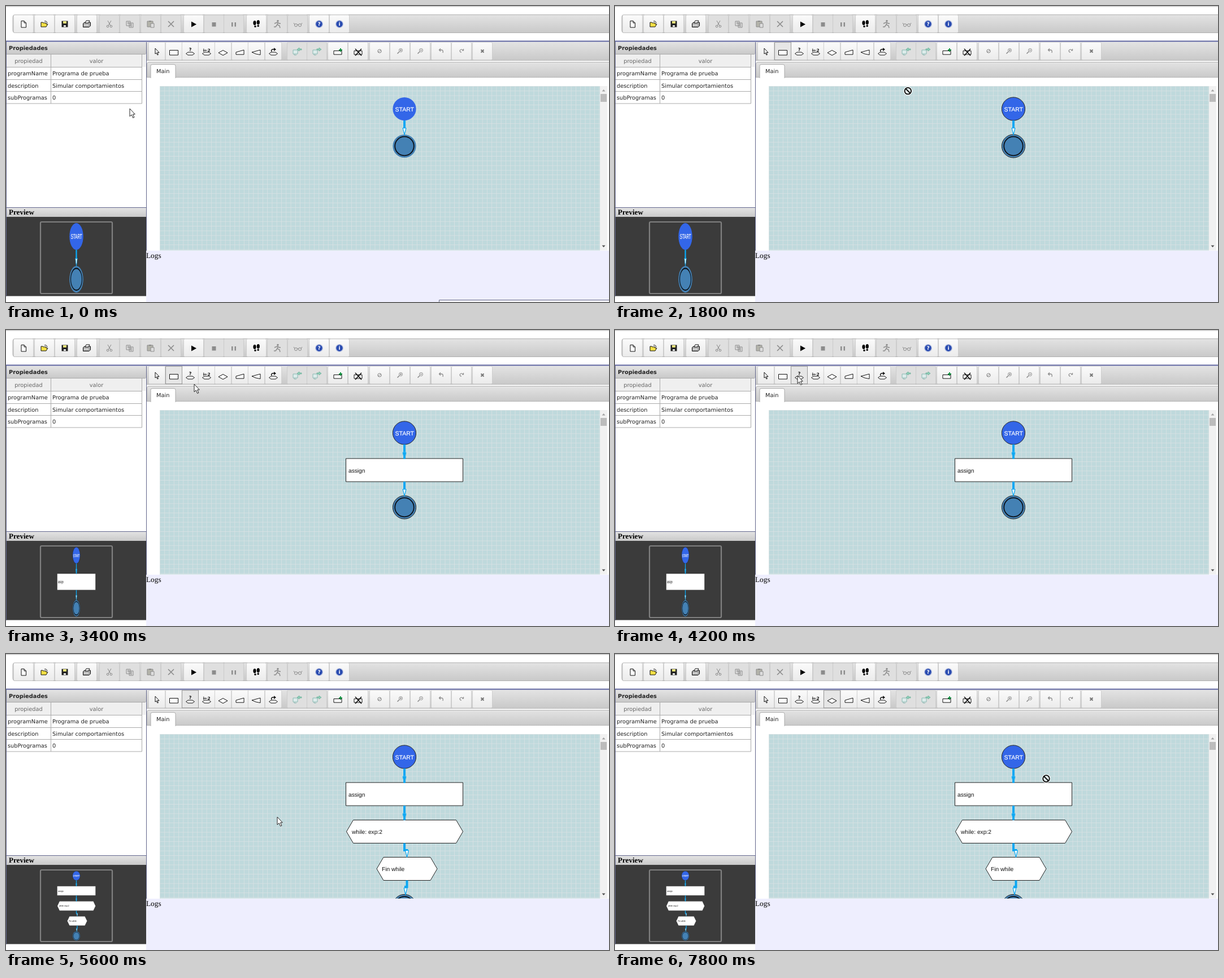
Recreate the animation shown at these times as an HTML page. Size 1067 by 525 pixels, loop 8 s.

```html
<!DOCTYPE html>
<html lang="es">
<head>
<meta charset="utf-8">
<style>
html, body { margin: 0; width: 100%; height: 100%; overflow: hidden; background: #fff; }
svg { display: block; text-rendering: geometricPrecision; }
.ui { font: 9.8px "DejaVu Sans", sans-serif; fill: #222; }
.serif { font: 13.3px "Liberation Serif", serif; fill: #000; }
.bold { font-weight: bold; }
.head { fill: #666; text-anchor: middle; }
.flow text { font: 10.2px "Liberation Sans", sans-serif; fill: #111; }
.flow .start { font-size: 10.5px; fill: #fff; stroke: #fff; stroke-width: .2; text-anchor: middle; }
</style>
</head>
<body>
<svg width="1067" height="525" viewBox="0 0 1067 525">
  <defs>
    <linearGradient id="bar" x2="0" y2="1"><stop stop-color="#e3e3e3"/><stop offset="1" stop-color="#c9c9c9"/></linearGradient>
    <linearGradient id="btn" x2="0" y2="1"><stop stop-color="#fbfbfb"/><stop offset="1" stop-color="#ebebeb"/></linearGradient>
    <pattern id="grid" x="272" y="142" width="8.27" height="8.27" patternUnits="userSpaceOnUse">
      <path d="M0 .4H8.27M.4 0V8.27" stroke="#d9e2e4" stroke-width=".85"/>
    </pattern>
    <clipPath id="view"><path d="M272 142H1051V433.5H272Z"/></clipPath>
  </defs>

  <path d="M0 0H1067V1.5H0Z" fill="#c9c9c9"/>
  <rect x="12" y="15.5" width="1070" height="32" rx="4" fill="url(#bar)" stroke="#b0b0b0"/>
  <path d="M249 64H1067V96H249Z" fill="url(#bar)"/>
  <path d="M249 96.5H1067" stroke="#b5b5b5"/>

  <!-- properties panel -->
  <path d="M1 64H248V85H1Z" fill="url(#bar)"/>
  <path d="M1 86H247V108H1Z" fill="#efefef"/>
  <path d="M1 85.5H247M1 108.5H240M1 130.5H240M1 151.5H240M1 173H240.5V86M79.5 86V173" fill="none" stroke="#aaa"/>
  <g class="ui">
    <text class="bold" x="5" y="77.5">Propiedades</text>
    <text class="head" x="40" y="101">propiedad</text><text class="head" x="160" y="101">valor</text>
    <text x="3" y="123">programName</text><text x="82" y="123">Programa de prueba</text>
    <text x="3" y="144.5">description</text><text x="82" y="144.5">Simular comportamientos</text>
    <text x="3" y="166">subProgramas</text><text x="82" y="166">0</text>
  </g>

  <!-- preview panel -->
  <path d="M1 358H248V374H1Z" fill="url(#bar)"/>
  <path d="M1 374H248V514.5H1Z" fill="#3b3b3b"/>
  <rect x="61" y="383" width="127" height="127" rx="2" fill="none" stroke="#808080" stroke-width="2.2"/>
  <g id="preview" class="flow"></g>
  <text class="serif bold" x="5" y="370" style="font-size:13.1px">Preview</text>

  <!-- editor -->
  <path d="M249 127V103Q249 99.5 253 99.5H1067V127Z" fill="url(#bar)"/>
  <path d="M249.5 127V103Q249.5 99.5 253 99.5H1067M249 126.5H1067" fill="none" stroke="#b5b5b5"/>
  <path d="M256 128V106.5Q256 103.5 259 103.5H297Q300 103.5 300 106.5V128" fill="#fff" stroke="#aaa"/>
  <text class="ui" x="266" y="119">Main</text>
  <path d="M272 142H1051V433.5H272Z" fill="#bfd9dc"/>
  <path d="M272 142H1051V433.5H272Z" fill="url(#grid)"/>
  <path d="M1051 142H1064V433.5H1051Z" fill="#f1f1f1"/>
  <path d="M1052 156H1063V170H1052Z" fill="#bcbcbc"/>
  <path d="M1054.5 151.5L1057.5 148L1060.5 151.5Z" fill="#a3a3a3"/>
  <path d="M1054.5 424.5L1057.5 428L1060.5 424.5Z" fill="#505050"/>
  <g clip-path="url(#view)"><g id="main" class="flow"></g></g>
  <path d="M248 434H1067V525H248Z" fill="#eeeefe"/>
  <text class="serif" x="248" y="447">Logs</text>
  <path id="status" d="M766.5 526V521.5H1068V526Z" fill="#f2f2fa" stroke="#676a86"/>
  <path d="M0 62.5H1067" stroke="#5a609c" stroke-width="2.2"/>
  <path d="M.5 63V515M248.5 64V434M0 357.5H248" stroke="#62668c"/>

  <g id="buttons"></g>
  <rect id="press" y="64.5" width="29" height="31" fill="#e6e6e6" stroke="#999"/>
  <g id="icons"></g>
  <g id="cursor"></g>
</svg>
<script>
const $ = id => document.getElementById(id);
const shape = (d, fill = 'none', stroke = 'none', w = 1) =>
  `<path d="${d}" fill="${fill}" stroke="${stroke}" stroke-width="${w}"/>`;
const circle = (x, y, r, fill, stroke = 'none', w = 1) =>
  `<circle cx="${x}" cy="${y}" r="${r}" fill="${fill}" stroke="${stroke}" stroke-width="${w}"/>`;
const label = (x, y, s, cls = '', style = '') =>
  `<text x="${x}" y="${y}" class="${cls}" style="${style}">${s}</text>`;
const at = (x, y, s) => `<g transform="translate(${x} ${y})">${s}</g>`;
const small = (s, y, color = '#111', size = 8) =>
  label(0, y, s, 'ui bold', `font-size:${size}px;fill:${color};text-anchor:middle`);

const K = '#111', G = '#8c8c8c', BLUE = '#0ba7f2', GREEN = '#1be04a';
const HEX = 'M-7.5 3.5L-4 1H4L7.5 3.5L4 6H-4Z';
const BOX = 'M-7 -1.5H7V5H-7Z';
const hex = shape(HEX, '#fff', K);
const lens = sign => shape('M-1 1L-4.5 4.5', 'none', G, 1.6) + circle(1.5, -1.5, 3, '#eee', G) +
  shape(sign, 'none', G);
const badge = s => circle(0, 0, 7, '#b9c2df') + circle(0, 0, 5.7, '#294bb0') + small(s, 3.3, '#fff', 9);
const swap = d => shape('M-7 -2H1V5H-7Z', '#dceceb', '#8ab8b2') + shape('M-5 5V7H-1', 'none', '#8ab8b2') +
  shape(d, '#8ed0b9', '#62a994', .7);

// [x, enabled, drawing]
const topIcons = [
  [31, 1, shape('M-4 -5.5H1L4.5 -2V6H-4ZM1 -5.5V-2H4.5', '#fff', K)],
  [68, 1, shape('M-6 5V-3H-3L-2 -2H3V0H6L3 5Z', '#f3df45', K) + shape('M0 -5Q4 -6 5 -2', 'none', K)],
  [104, 1, shape('M-5.5 -5.5H5.5V5.5H-5.5Z', '#222') + shape('M-3 -5H3V-1H-3Z', '#e9e37a') + shape('M-2 2H2V5H-2Z', '#ddd')],
  [143, 1, shape('M-6.5 -1L-4 -3H6.5V3L4 5.5H-6.5Z', '#aaa', K) + shape('M-3 -2L-1 -6H5L3 -2Z', '#fff', K) + shape('M-5 2H3', 'none', '#fff')],
  [183, 0, shape('M-3 -6L2 3M3 -6L-2 3', 'none', G) + circle(-3, 4, 1.8, 'none', G) + circle(3, 4, 1.8, 'none', G)],
  [219, 0, shape('M-6 -5H1V3H-6ZM-1 -2H6V6H-1Z', '#ddd', G) + shape('M1 0H4M1 2H4M1 4H4M-4 -3H-1M-4 -1H-1', 'none', G)],
  [256, 0, shape('M-6 -5H4V5H-6Z', '#b3b3aa', G) + shape('M-3 -6H1V-4H-3Z', G) + shape('M0 -1H6V6H0Z', '#ddd', G)],
  [292, 0, shape('M-5 -5L5 5M5 -5L-5 5', 'none', G, 1.6)],
  [332, 1, shape('M-4 -4.5L5 .5L-4 5.5Z', '#000')],
  [368, 0, shape('M-3.5 -3H3.5V4.5H-3.5Z', G)],
  [403, 0, shape('M-4 -3H-1.5V4.5H-4ZM1.5 -3H4V4.5H1.5Z', G)],
  [443, 1, '<g fill="#000"><ellipse cx="-3" cy="-2" rx="2.6" ry="4"/><ellipse cx="3.3" cy="-3" rx="2.6" ry="4"/></g>' +
    circle(-2, 4.2, 1.7, '#000') + circle(3.2, 3.2, 1.7, '#000')],
  [480, 0, circle(1, -5.5, 1.7, G) + shape('M-5 -1L0 -3L4 -1H6M1 -2L0 1L4 3L5 7M0 1L-3 5H-6', 'none', G, 1.4)],
  [516, 0, circle(-3, 2, 2.5, 'none', G) + circle(4, 2, 2.5, 'none', G) + shape('M-5 1L-7 -2M6 1L8 -2M-1 1H2', 'none', G)],
  [554, 1, badge('?')],
  [590, 1, badge('i')]
];
const tools = [
  [267, 1, shape('M-3 -6V4L-.8 2.2L1 6L2.4 5.3L.8 1.6H4Z', '#fff', K)],
  [297, 1, shape('M-7.5 -2.5H7.5V6H-7.5Z', '#fff', K)],
  [326, 1, hex + small('?', -1)],
  [355, 1, hex + small('i←2', -.5, K, 7)],
  [384, 1, shape('M-8 2L0 -2.5L8 2L0 6.5Z', '#fff', K)],
  [414, 1, shape('M-7 5V1L7 -3V5Z', '#fff', K)],
  [443, 1, shape('M-8 1L7 -3V5.5L-1 4Z', '#fff', K)],
  [473, 1, hex + shape('M-3 0Q-5 -5 2 -4', 'none', K, 1.5) + shape('M1 -7L5 -4L1 -1Z', K)],
  [515, 0, swap('M0 -3L4 -6V-4H8V-2H4V0Z')],
  [550, 0, swap('M8 -3L4 -6V-4H0V-2H4V0Z')],
  [587, 1, shape(BOX, '#fff', K) + shape('M5 -6V0M2 -3H8', 'none', '#169344', 2)],
  [623, 1, shape(BOX, '#fff', K) + shape('M-5 -5L6 7M6 -5L-5 7', 'none', K, 1.7)],
  [661, 0, circle(0, 0, 3, 'none', G, 1.2) + shape('M-2 2L2 -2', 'none', G)],
  [697, 0, lens('M0 -1.5H3M1.5 -3V0')],
  [733, 0, lens('M0 -1.5H3')],
  [770, 0, shape('M-3 -2H1Q4 -2 3 3M-1 -4.5L-3.5 -2L-1 .5', 'none', G, 1.3)],
  [806, 0, shape('M3 -1Q0 -5 -3 -1Q-3 2 0 2M1 -1H3.5V-4', 'none', G, 1.2)],
  [843, 0, shape('M-2.5 -2.5L2.5 2.5M2.5 -2.5L-2.5 2.5', 'none', '#777', 2)]
];
const button = (x, y, w, on) =>
  `<rect x="${x - w / 2}" y="${y}" width="${w}" height="31.5" rx="2" fill="${on ? 'url(#btn)' : '#dfdfdf'}" stroke="#c8c8c8" stroke-width=".8"/>`;
const toolButton = ([x, on], i) => button(x, 64.3, i < 8 ? 29.4 : 35, on || i > 11);
$('buttons').innerHTML = topIcons.map(([x, on]) => button(x, 15.8, 35, on)).join('') + tools.map(toolButton).join('');
$('icons').innerHTML = topIcons.map(([x, , d]) => at(x, 32, d)).join('') +
  tools.map(([x, on, d]) => at(x, on ? 81 : 80, d)).join('');

function link(d, x, y, solid, color) {
  const body = shape(d + (solid ? `V${y}` : `V${y - 11}`), 'none', color, 4);
  const tip = `M${x - 2.8} ${y - 12}H${x + 2.8}L${x} ${y}Z`;
  return body + (solid ? shape(tip, color, '#55c4f5', .7) + shape(`M${x - 3} ${y - 11}L${x} ${y}L${x + 3} ${y - 11}`, 'none', color)
    : shape(tip, '#fff', color, 1.2));
}
const hexagon = (x0, x1, y) => shape(
  `M${x0} ${y}L${x0 + 12} ${y - 20.5}H${x1 - 12}L${x1} ${y}L${x1 - 12} ${y + 20.5}H${x0 + 12}Z`, '#fff', '#222');

// Flow chart after 0, 1 or 2 inserted blocks
function flow(stage, outlined, hot) {
  const edge = outlined ? '#222' : 'none', end = [248.5, 314.5, 447][stage];
  const color = i => hot === i ? GREEN : BLUE;
  let s = circle(705, 182.5, 20.6, '#3366e8', edge) + label(705.3, 186.5, 'START', 'start') +
    circle(705, end, 20.6, '#4481b4', edge) + circle(705, end, 16.8, 'none', '#0b1118', 1.8);
  if (stage) s += shape('M601.5 228H808.5V269H601.5Z', '#fff', '#222') + label(606, 252.5, 'assign');
  if (stage > 1) s += hexagon(602.5, 808.5, 315) + label(612, 318.5, 'while: exp:2') +
    hexagon(656, 763, 381) + label(665, 384.5, 'Fin while');
  s += link('M705 203', 705, 228.5, stage > 0, color(0));
  if (stage) s += link('M705 269', 705, 294.5, stage > 1, color(1));
  if (stage > 1) s += link('M705 335.5V348H709.5', 709.5, 360.5, 0, BLUE) + link('M709.5 401.5V413H707', 707, 427, 0, BLUE);
  return s;
}

const ghosts = ['M-11 -7H11V7H-11Z', 'M-13 0L-9 -4.7H9L13 0L9 4.7H-9Z'];
const cursors = {
  arrow: shape('M0 0V13.8L3.2 10.9L5.6 16.4L7.9 15.4L5.5 10H9.3Z', '#fff', '#222'),
  no: circle(0, 0, 6, '#fff', '#fff', 3.5) + circle(0, 0, 5.8, '#dfe9e9', '#000', 1.8) + shape('M-4 -4L4 4', 'none', '#000', 1.8),
  hand: shape('M-.5 .5Q1 -.8 2 1L4 5L8 3.5Q9.5 5 9 10L7.5 12.5L2 13L-2.5 8Q-2.5 6.5 0 7.5L1.5 8Z', '#fff', '#111', 1.1) +
    shape('M1.5 12.5H8V15.5H1.5Z', '#111')
};

// [time, x, y, cursor]
const path = [
  [0, 219, 182, 'arrow'], [800, 391, 128, 'arrow'], [1200, 299, 85, 'arrow'], [1400, 299, 85, 'arrow'],
  [1600, 400, 115, 'no'], [2200, 755, 222, 'no'], [2400, 701, 220, 'hand'], [2600, 707, 214, 'hand'],
  [2800, 707, 214, 'hand'], [3000, 690, 205, 'arrow'], [3400, 333, 96, 'arrow'], [3800, 323, 81, 'arrow'],
  [4200, 323, 81, 'arrow'], [4400, 430, 130, 'no'], [4800, 680, 265, 'no'], [5000, 710, 279, 'hand'],
  [5200, 710, 280, 'arrow'], [5600, 480, 289, 'arrow'], [6400, 352, 76, 'arrow'], [6800, 352, 76, 'arrow'],
  [7000, 378, 79, 'arrow'], [7200, 378, 79, 'arrow'], [7400, 500, 125, 'no'], [7800, 763, 221, 'no']
];
function pointer(t) {
  let i = path.length - 1;
  while (path[i][0] > t) i--;
  const a = path[i], b = path[i + 1] || a;
  const k = (t - a[0]) / (b[0] - a[0] || 1);
  return [a[1] + (b[1] - a[1]) * k, a[2] + (b[2] - a[2]) * k, a[3]];
}

const stageAt = t => (t >= 3000) + (t >= 5200);
const scaleX = [.594, .329, .329], scaleY = [1.15, .711, .404];
let last = -1;

function draw(t) {
  const stage = stageAt(t), mini = stageAt(t - 200);
  const [x, y, kind] = pointer(t);
  const held = kind === 'hand';
  $('main').innerHTML = flow(stage, t >= 1800, held ? stage : -1);
  $('preview').innerHTML = flow(mini, mini > 0, -1);
  $('preview').setAttribute('transform', `translate(124.5 385) scale(${scaleX[mini]} ${scaleY[mini]}) translate(-705 -161.8)`);
  const tool = (t >= 1400) + (t >= 4200) + (t >= 6600) + (t >= 7200);
  $('press').setAttribute('x', tools[tool][0] - 14.5);
  $('press').style.opacity = tool ? 1 : 0;
  $('status').style.opacity = Math.max(0, 1 - t / 1000);
  $('cursor').innerHTML = (held ? at(x + 1.5, y + 1.5, shape(ghosts[stage], '#fff', '#111', 1.1)) : '') + at(x, y, cursors[kind]);
}

const start = performance.now();
function tick(now) {
  const t = Math.floor(Math.max(0, now - start) % 8000 / 200) * 200;
  if (t !== last) draw(last = t);
  requestAnimationFrame(tick);
}
tick(start);
</script>
</body>
</html>
```
